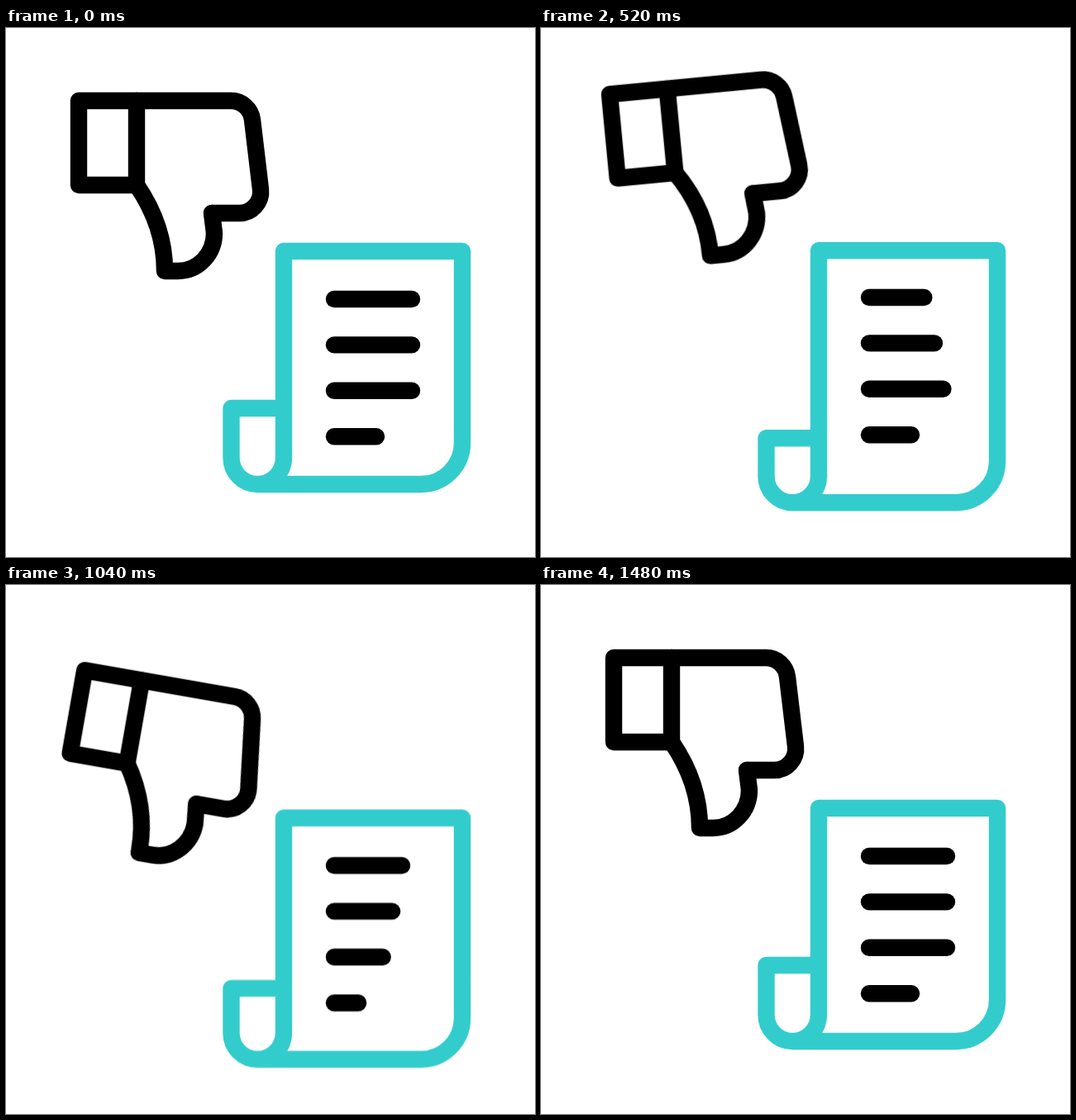
An HTML page without scripts for the animation above (1600 ms loop, 640 by 640 pixels).

```html
<!DOCTYPE html>
<html lang="en">
<head>
<meta charset="utf-8">
<title>Thumbs down on a document</title>
<style>
  html, body { margin: 0; width: 100%; height: 100%; overflow: hidden; background: #fff; }
  svg { display: block; width: 100%; height: 100%; }

  path {
    fill: none;
    stroke: #000;
    stroke-width: 20.4;
    stroke-linecap: round;
    stroke-linejoin: round;
  }

  .hand, .thumb, .sheet, .paper, .line {
    animation: 1600ms cubic-bezier(.333, 0, .667, 1) infinite;
  }

  .hand { transform-origin: 4px 137px; animation-name: swing; }
  .thumb { animation-name: bend; }
  .sheet { animation-name: bob; }
  .paper { stroke: #3cc; animation-name: stretch; }

  /* Each line repeats the same squeeze a little after the one above. */
  .line {
    transform: translateY(calc(var(--row) * 55.4px));
    animation-name: squeeze;
    animation-delay: calc(var(--row) * 81ms);
  }
  .line.short { animation-name: squeeze-short; }

  @keyframes swing {
    0%, 85.6%, 100% { transform: rotate(0deg); }
    30% { transform: rotate(-6deg); }
    55.6% { transform: rotate(13deg); }
  }

  @keyframes bend {
    0%, 30%, 68.75%, 100% {
      d: path("M249 224L252 248C252 273 233 294 208 294L192 294C192 258 180 222 158 190");
    }
    46.25% {
      d: path("M249 224L245 248C241 275 221 295 192 295L174 295C183 258 180 222 158 190");
    }
  }

  @keyframes bob {
    0%, 92.5%, 100% { transform: translateY(0); }
    15.6% { transform: translateY(1.5px); }
    43.75% { transform: translateY(-4px); }
    71.9% { transform: translateY(14px); }
  }

  @keyframes stretch {
    0%, 17.2%, 74.4%, 100% {
      d: path("M336 460H272.5V520A31.75 32 0 0 0 336 520V270H552V502A50 50 0 0 1 502 552H304");
    }
    43.4%, 47.2% {
      d: path("M336 521H272.5V558.5A31.75 32 0 0 0 336 558.5V272H552V540.5A50 50 0 0 1 502 590.5H304");
    }
  }

  @keyframes squeeze {
    0%, 17.2%, 74.4%, 100% { d: path("M397 328H491"); }
    43.4%, 47.2% { d: path("M397 328H447"); }
  }

  @keyframes squeeze-short {
    0%, 17.2%, 74.4%, 100% { d: path("M397 328H448"); }
    43.4%, 47.2% { d: path("M397 328H425.5"); }
  }
</style>
</head>
<body>
<svg viewBox="0 0 640 640">
  <g class="hand">
    <path d="M158 88H88V190H158Z"/>
    <path d="M158 88H272A26 26 0 0 1 298 111L308 195A26 26 0 0 1 282 224H249"/>
    <path class="thumb" d="M249 224L252 248C252 273 233 294 208 294L192 294C192 258 180 222 158 190"/>
  </g>
  <g class="sheet">
    <path class="paper" d="M336 460H272.5V520A31.75 32 0 0 0 336 520V270H552V502A50 50 0 0 1 502 552H304"/>
    <path class="line" style="--row: 0" d="M397 328H491"/>
    <path class="line" style="--row: 1" d="M397 328H491"/>
    <path class="line" style="--row: 2" d="M397 328H491"/>
    <path class="line short" style="--row: 3" d="M397 328H448"/>
  </g>
</svg>
</body>
</html>
```
